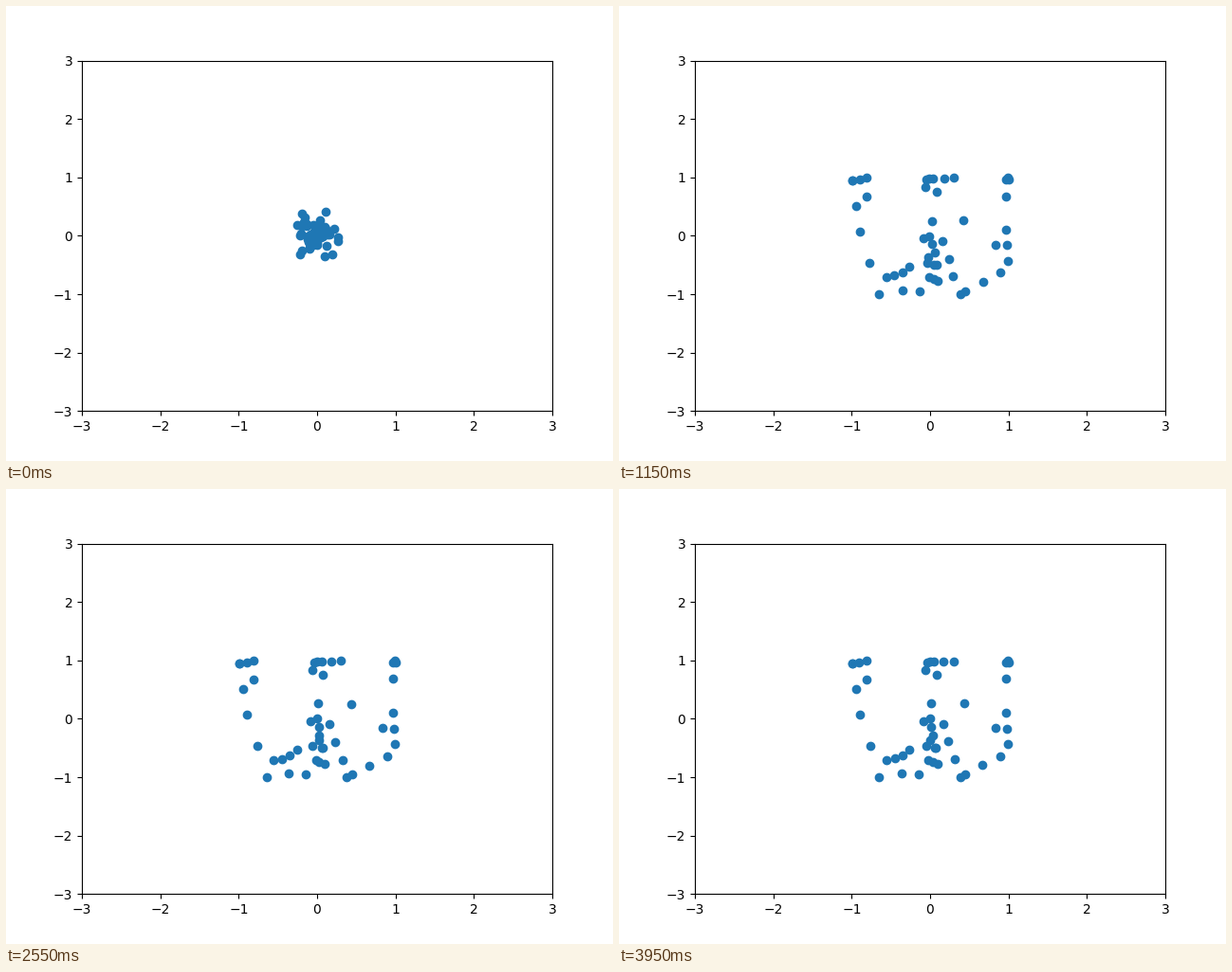
A matplotlib script that plays this animation: 640 px wide and 480 px high, repeating every 4000 ms.

```python
import numpy as np
import matplotlib.pyplot as plt
from matplotlib.animation import FuncAnimation

FRAMES = 80
INTERVAL = 50
SETTLE = 1.5  # time constant of the spread, in frames


def spread(n, *keys):
    """Place n dots at even steps along a path through the key points."""
    keys = np.array(keys)
    steps = np.arange(len(keys))
    t = np.linspace(0, len(keys) - 1, n)
    return np.column_stack([np.interp(t, steps, c) for c in keys.T])


def by_angle(pts):
    return np.argsort(np.arctan2(pts[:, 1], pts[:, 0]))


# Settled shape: sides, top, middle stem and bottom
home = np.vstack([
    spread(5, (-.99, .95), (-.89, .07), (-.65, -1)),
    spread(3, (-.99, .94), (-.81, .99)),
    spread(4, (.97, .68), (.97, .96), (.995, .99), (1, .96)),
    spread(6, (.97, .1), (1, -.56), (.45, -.95)),
    spread(5, (-.045, .97), (.05, .98), (.305, .99)),
    spread(3, (-.81, .67), (-.065, .83), (.075, .75)),
    spread(3, (.015, .26), (.43, .26), (.84, -.15)),
    spread(1, (-.08, -.04)),
    spread(5, (0, 0), (.035, -.28), (-.045, -.46)),
    spread(2, (.05, -.495), (.075, -.495)),
    spread(3, (-.02, -.71), (.095, -.775)),
    spread(4, (.16, -.09), (.385, -1)),
    spread(4, (-.56, -.71), (-.39, -.67), (-.265, -.53)),
    spread(2, (-.36, -.93), (-.14, -.95)),
])

rng = np.random.default_rng(4)
cloud = rng.normal(0, (.13, .17), home.shape).clip(-.35, .41)
start = np.empty_like(home)
start[by_angle(home)] = cloud[by_angle(cloud)]

# Dots near the limits of the square barely move
freedom = 1 - .9 * home ** 2
sway = rng.normal(0, .008, home.shape) * freedom


def positions(k):
    noise = np.random.default_rng([7, k]).normal(0, .004, home.shape)
    goal = home + sway * np.sin(2 * np.pi * k / FRAMES) + noise * freedom
    return goal + (start - goal) * np.exp(-k / SETTLE)


fig, ax = plt.subplots(figsize=(6.4, 4.8), dpi=100)
ax.set_xlim(-3, 3)
ax.set_ylim(-3, 3)
dots = ax.scatter(*start.T)


def update(k):
    dots.set_offsets(positions(k))
    return (dots,)


anim = FuncAnimation(fig, update, frames=FRAMES, interval=INTERVAL,
                     repeat=True, repeat_delay=0)
plt.show()
```
